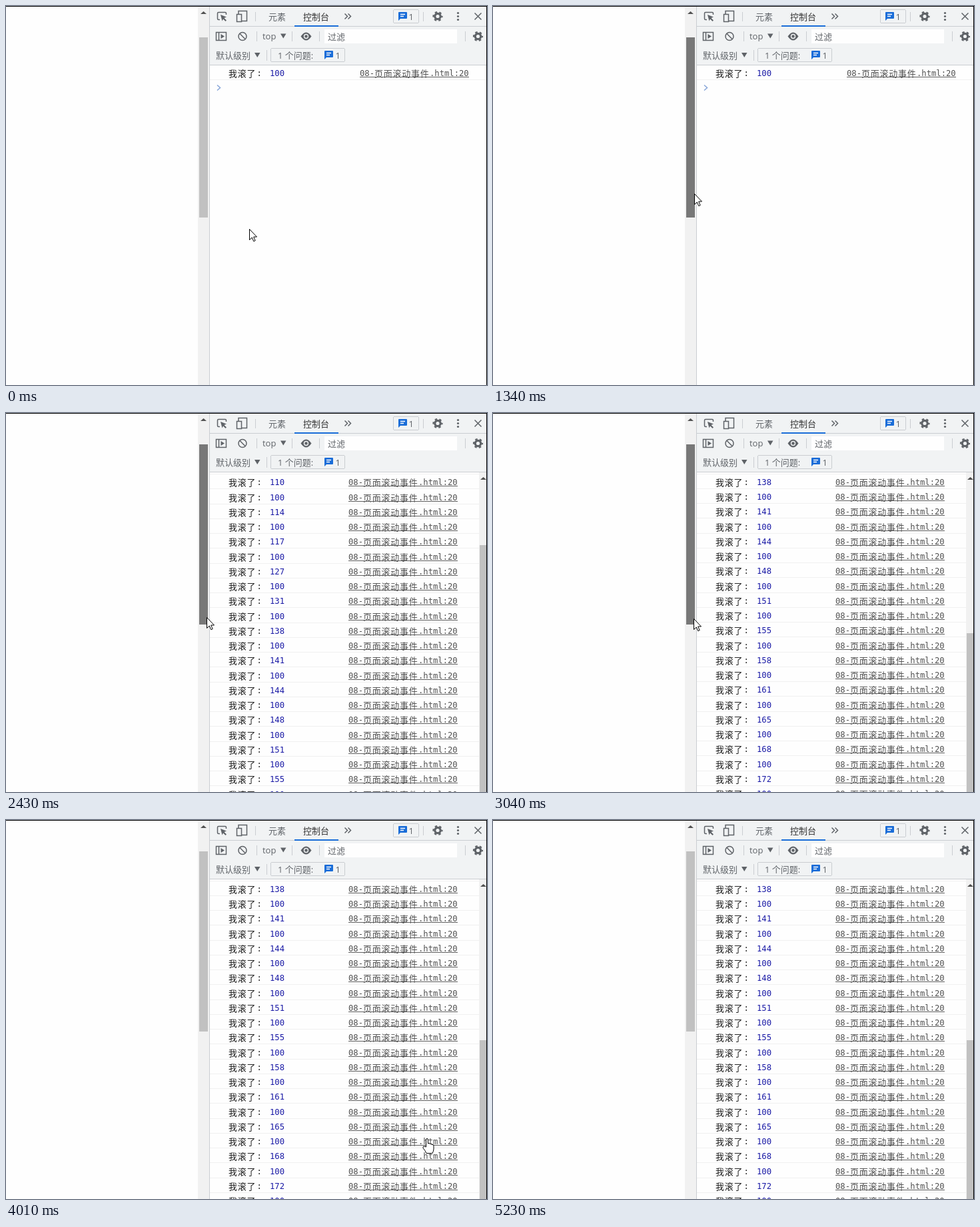
Animation of 722x568 px, one loop 5.39 s. Source, as an HTML page:

```html
<!DOCTYPE html>
<html lang="zh-CN">
<head>
<meta charset="utf-8">
<style>
html, body { margin: 0; width: 100%; height: 100%; overflow: hidden; background: #fefefe; }
svg { display: block; }
text { font: 13px "Noto Sans CJK SC", "Noto Sans CJK", sans-serif; fill: #5f6368; white-space: pre; }
.ui { font-family: "Open Sans", "Noto Sans CJK SC", "Noto Sans CJK", sans-serif; }
.cjk { letter-spacing: .75px; }
.mono { font: 12.2px "DejaVu Sans Mono", monospace; }
.log text { fill: #1c1c1c; }
.log .num { fill: #1a1aa6; }
.log .link text { fill: #505050; }
.line { fill: none; stroke: #5f6368; stroke-width: 1.5; }
.solid { fill: #5f6368; }
.sep { stroke: #cacdd1; fill: none; shape-rendering: crispEdges; }
.cursor { fill: #fff; stroke: #000; stroke-linejoin: round; }
</style>
</head>
<body>
<svg width="722" height="568" viewBox="0 0 722 568">
  <defs>
    <clipPath id="view"><rect x="306" y="89" width="415" height="479"/></clipPath>
    <g id="gear" fill="none" stroke="#5f6368">
      <circle r="4.2" stroke-width="3.2"/>
      <circle r="6.4" stroke-width="2.4" stroke-dasharray="3.351 3.351" stroke-dashoffset="1.676"/>
    </g>
    <g id="chat">
      <path d="M1 0H12Q13 0 13 1V9Q13 10 12 10H3L0 13V1Q0 0 1 0Z" fill="#1a6dd8"/>
      <path d="M3 3.5H10M3 6.5H8" stroke="#fff" stroke-width="1.3"/>
    </g>
  </defs>

  <!-- page scrollbar -->
  <rect x="288" width="17" height="568" fill="#f1f1f1"/>
  <path d="M292 12L296.500 8L301 12Z" fill="#505050"/>
  <rect id="thumb" x="290" y="47" width="13" height="270"/>

  <!-- console output -->
  <g clip-path="url(#view)">
    <g id="list">
      <g id="rows"></g>
      <path id="prompt" d="M317 -4L321.500 0L317 4" fill="none" stroke="#86a5d8" stroke-width="1.5"/>
    </g>
    <g id="bar">
      <rect x="710" y="89" width="12" height="479" fill="#f1f1f1"/>
      <path d="M712 100L716.500 96L721 100Z" fill="#505050"/>
      <rect id="barThumb" x="711" width="11" fill="#c1c1c1"/>
    </g>
  </g>

  <!-- toolbars -->
  <rect x="306" y="1" width="415" height="87" fill="#f1f3f4"/>
  <path class="sep" d="M305.500 0V568M306 30.500H721M306 88.500H721M374.500 9V23M626.500 9V23M376.500 38V53M429.500 38V53M470.500 38V53M689.500 38V53M391.500 66V82"/>
  <rect x="433" y="29" width="66" height="2" fill="#1a6dd8"/>

  <path class="line" d="M321 20.500H319Q317.500 20.500 317.500 19V11Q317.500 9.500 319 9.500H329Q330.500 9.500 330.500 11V13"/>
  <path class="solid" d="M322 13L331 16.500L327.500 18L331 21.500L329.500 23L326 19.500L324.500 22.500Z"/>
  <path class="line" d="M349 12V7.500H361.500V22.500H354M346.500 12.500H353.500V23.500H346.500Z"/>
  <text class="ui" x="394" y="21">元素</text>
  <text class="ui" x="446" y="21" style="fill:#333">控制台</text>
  <path class="line" d="M508.500 11.500L512.500 15.500L508.500 19.500M513.500 11.500L517.500 15.500L513.500 19.500"/>
  <rect class="sep" x="581.500" y="5.500" width="38" height="20" rx="2"/>
  <use href="#chat" x="589" y="9"/>
  <text class="ui" x="604.500" y="20.500">1</text>
  <use href="#gear" x="648" y="15.500"/>
  <g class="solid"><circle cx="678.500" cy="10.500" r="1.600"/><circle cx="678.500" cy="15.500" r="1.600"/><circle cx="678.500" cy="20.500" r="1.600"/></g>
  <path class="line" d="M703.500 10.500L713.500 20.500M713.500 10.500L703.500 20.500"/>

  <path class="line" d="M315.500 39.500H330.500V51.500H315.500ZM319.500 39.500V51.500"/>
  <path class="solid" d="M322.500 42L328 45.500L322.500 49Z"/>
  <circle class="line" cx="355" cy="45.500" r="6"/>
  <path class="line" d="M350.800 41.300L359.200 49.700"/>
  <text class="ui" x="385" y="50">top</text>
  <path class="solid" d="M412 41.500H420.500L416.250 48.500Z"/>
  <path class="solid" d="M442.500 45.500Q450.500 33.500 458.500 45.500Q450.500 57.500 442.500 45.500Z"/>
  <circle class="solid" cx="450.500" cy="45.500" r="3" stroke="#f1f3f4" stroke-width="1.400"/>
  <rect x="478" y="35" width="199" height="21" fill="#fefefe"/>
  <text class="ui" x="483" y="50.500">过滤</text>
  <use href="#gear" x="708.500" y="45.500"/>

  <text class="ui" x="315" y="78.500">默认级别</text>
  <path class="solid" d="M373 70H381.500L377.250 77Z"/>
  <rect class="sep" x="397.500" y="63.500" width="111" height="20" rx="2"/>
  <text class="ui" x="408" y="78.500">1 个问题:</text>
  <use href="#chat" x="478" y="67"/>
  <text class="ui" x="494.500" y="78.500">1</text>

  <path d="M0 .5H722M721.500 0V568" stroke="#000" shape-rendering="crispEdges"/>

  <path id="arrow" class="cursor" d="M.5 .5V16.500L4.300 13L6.800 18.700L9.200 17.600L6.700 12H11.500Z"/>
  <path id="hand" class="cursor" d="M-1.500 13V2Q-1.500 .5 0 .5T1.500 2V8Q3 6.500 4.500 8.500Q6 7.500 7.200 9.500Q9.500 8.500 10 11V16Q10 19 8 22.500H-1Q-3 18 -6 14.500Q-6.500 11.500 -4 12Z"/>
</svg>

<script>
const LOOP = 5390, PITCH = 22.25, FIRST = 101, VIEW = 804, TOTAL = 50;
const $ = id => document.getElementById(id);

const offsets = [103, 107, 110, 114, 117, 127, 131, 138, 141, 144, 148, 151, 155,
  158, 161, 165, 168, 172, 175, 179, 182, 185, 189, 192, 196];
const value = i => i % 2 ? offsets[(i - 1) / 2] : 100;

// [time, value...]
const countKeys = [[2030, 1], [2230, 21], [2430, 40], [2640, 50]];
const cursorKeys = [[0, 365, 334], [40, 365, 334], [570, 318, 297], [850, 302, 281],
  [1990, 302, 281], [2230, 301, 296], [2430, 301, 306], [2640, 301, 308], [3360, 301, 308],
  [3890, 604, 462], [4010, 632, 477], [4460, 634, 538], [4580, 634, 572]];

$('rows').innerHTML = Array.from({ length: TOTAL }, (_, i) => `
  <g class="log" transform="translate(0 ${Math.round(FIRST + i * PITCH)})">
    <path d="M306 9.500H721" stroke="#f0f0f0" shape-rendering="crispEdges"/>
    <text class="cjk" x="334" y="4.500">我滚了</text>
    <text class="mono" x="376.500" y="4">:</text>
    <text class="mono num" x="396" y="4">${value(i)}</text>
    <g class="link">
      <text class="mono" x="531" y="4">08-</text>
      <text class="cjk" x="553" y="4.500">页面滚动事件</text>
      <text class="mono" x="636" y="4">.html:20</text>
      <path d="M531 5.500H695" stroke="#606060" shape-rendering="crispEdges"/>
    </g>
  </g>`).join('');
const rows = [...$('rows').children];
const links = [...document.querySelectorAll('.link')];

function lerp(keys, t) {
  const k = keys.findIndex(key => key[0] > t);
  if (k < 0) return keys[keys.length - 1].slice(1);
  if (k === 0) return keys[0].slice(1);
  const a = keys[k - 1], b = keys[k], p = (t - a[0]) / (b[0] - a[0]);
  return a.slice(1).map((v, i) => v + (b[i + 1] - v) * p);
}

// The picture advances in steps of 40 ms.
function snap(t) {
  const phase = t >= 1990 && t < 2600 ? 30 : 10;
  return Math.max(0, Math.floor((t - phase) / 40) * 40 + phase);
}

function thumbColor(t) {
  if (t < 730 || t >= 3400) return '#c1c1c1';
  return t < 1220 || t >= 3050 ? '#a8a8a8' : '#787878';
}

const move = (el, x, y) => el.setAttribute('transform', `translate(${x} ${y})`);
const show = (el, on) => el.setAttribute('visibility', on ? 'visible' : 'hidden');

function draw(time) {
  const t = snap(time);
  const n = Math.floor(lerp(countKeys, t)[0] + 1e-6);
  const height = (n + 1) * PITCH;
  const scroll = Math.max(0, height - VIEW);

  rows.forEach((row, i) => show(row, i < n));
  links.forEach(link => move(link, scroll ? -17 : 0, 0));
  move($('list'), 0, -Math.round(scroll));
  move($('prompt'), 0, FIRST + n * PITCH - .75);

  const track = VIEW - 36;
  show($('bar'), scroll > 0);
  $('barThumb').setAttribute('y', Math.round(106.5 + scroll * track / height));
  $('barThumb').setAttribute('height', track * VIEW / height);
  $('thumb').setAttribute('fill', thumbColor(t));

  const [x, y] = lerp(cursorKeys, t).map(Math.round);
  const rowOffset = (y + scroll - FIRST + PITCH / 2) % PITCH - PITCH / 2;
  const onLink = scroll > 0 && x >= 514 && x <= 678 && Math.abs(rowOffset) < 8;
  move($('arrow'), x, y);
  move($('hand'), x, y);
  show($('arrow'), !onLink);
  show($('hand'), onLink);
}

function tick() {
  draw(performance.now() % LOOP);
  requestAnimationFrame(tick);
}
tick();
</script>
</body>
</html>
```
